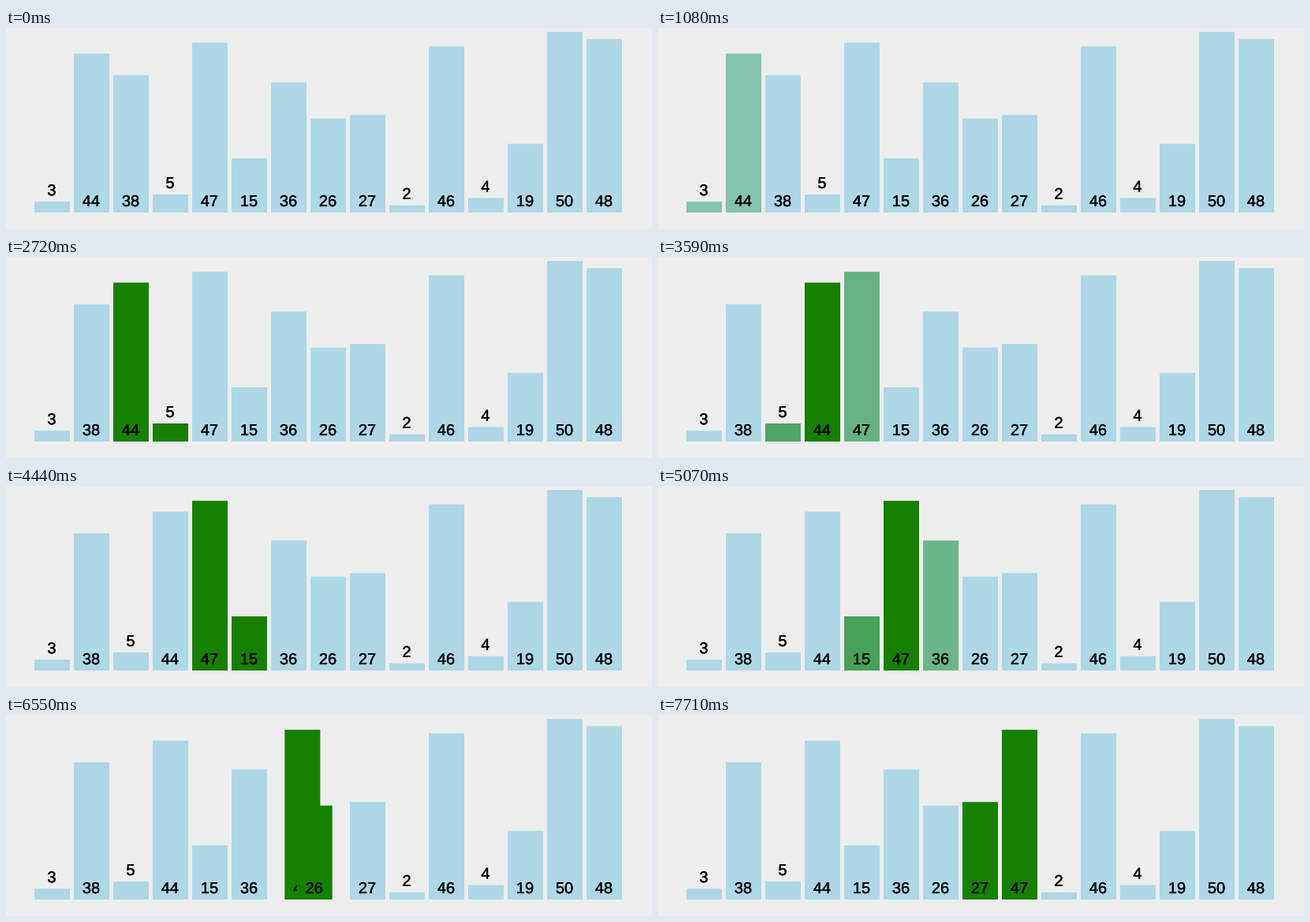
Animation of 819 by 256 pixels, one loop 8 s. Source, as a matplotlib script:

```python
import numpy as np
import matplotlib.pyplot as plt
from matplotlib.animation import FuncAnimation
from matplotlib.colors import to_rgb
from matplotlib.patches import Rectangle
from matplotlib.patheffects import withStroke

plt.rcParams["font.family"] = ["Liberation Sans"]

W, H, DPI = 819, 256, 64
PX = 72 / DPI  # one pixel in points
LOOP, STEP = 8000, 20

VALUES = [3, 44, 38, 5, 47, 15, 36, 26, 27, 2, 46, 4, 19, 50, 48]
LEFT, PITCH, BAR_W, BASE, UNIT = 36, 50, 45, 235, 4.6
BACKGROUND = "#ededed"
BLUE, GREEN = np.array(to_rgb("lightblue")), np.array(to_rgb("green"))

# Operations begin at a steady beat (ms).
FIRST, EVERY, DURATION = 960, 495, 305


def ease(t):
    """Cubic in-out."""
    t = min(max(t, 0), 1)
    return 4 * t ** 3 if t < 0.5 else 1 - 4 * (1 - t) ** 3


def bar_color(glow):
    """Mix blue and green, with the slight tint of the display in linear light."""
    r, g, b = (BLUE + (GREEN - BLUE) * glow) ** 2.2
    tinted = np.array([0.98 * r + 0.02 * g, g, 1.02 * b - 0.02 * g])
    return np.clip(tinted, 0, 1) ** (1 / 2.2)


def bubble_pass(values):
    """List the compare and swap operations of one pass as bar indices."""
    order = list(range(len(values)))
    ops = []
    for j in range(len(order) - 1):
        a, b = order[j], order[j + 1]
        ops.append(("compare", a, b))
        if values[a] > values[b]:
            ops.append(("swap", a, b))
            order[j], order[j + 1] = b, a
    return ops


OPS = bubble_pass(VALUES)


def state_at(ms):
    """Return the slot and the highlight amount of every bar."""
    slots = np.arange(len(VALUES), dtype=float)
    glow = np.zeros(len(VALUES))
    for k, (kind, a, b) in enumerate(OPS):
        p = ease((ms - FIRST - EVERY * k) / DURATION)
        if p == 0:
            break
        if kind == "swap":
            slots[a] += p
            slots[b] -= p
        else:
            goal = np.zeros(len(VALUES))
            goal[[a, b]] = 1
            glow += (goal - glow) * p
    return slots, glow


fig = plt.figure(figsize=(W / DPI, H / DPI), dpi=DPI, facecolor=BACKGROUND)
ax = fig.add_axes([0, 0, 1, 1])
ax.set_xlim(0, W)
ax.set_ylim(H, 0)
ax.axis("off")

# A hairline outline gives the digits their slightly heavy look.
heavier = [withStroke(linewidth=0.4 * PX, foreground="black")]

bars, labels = [], []
for i, value in enumerate(VALUES):
    height = value * UNIT
    top = BASE - height
    bar = Rectangle((0, top), BAR_W, height, lw=0, zorder=2 * i + 1)
    bar.set_snap(False)
    bars.append(ax.add_patch(bar))
    too_short = height < 25
    baseline = (top if too_short else BASE) - 8
    labels.append(ax.text(0, baseline, str(value), color="black",
                          fontsize=20 * PX, ha="center", va="baseline",
                          path_effects=heavier, zorder=2 * i + 2))


def draw(frame):
    slots, glow = state_at(frame * STEP)
    for bar, label, slot, g in zip(bars, labels, slots, glow):
        x = LEFT + PITCH * slot
        bar.set_x(x)
        bar.set_facecolor(bar_color(g))
        label.set_x(x + BAR_W / 2 - 0.5)
    return bars + labels


anim = FuncAnimation(fig, draw, frames=LOOP // STEP, interval=STEP,
                     repeat=True, repeat_delay=0)
plt.show()
```
